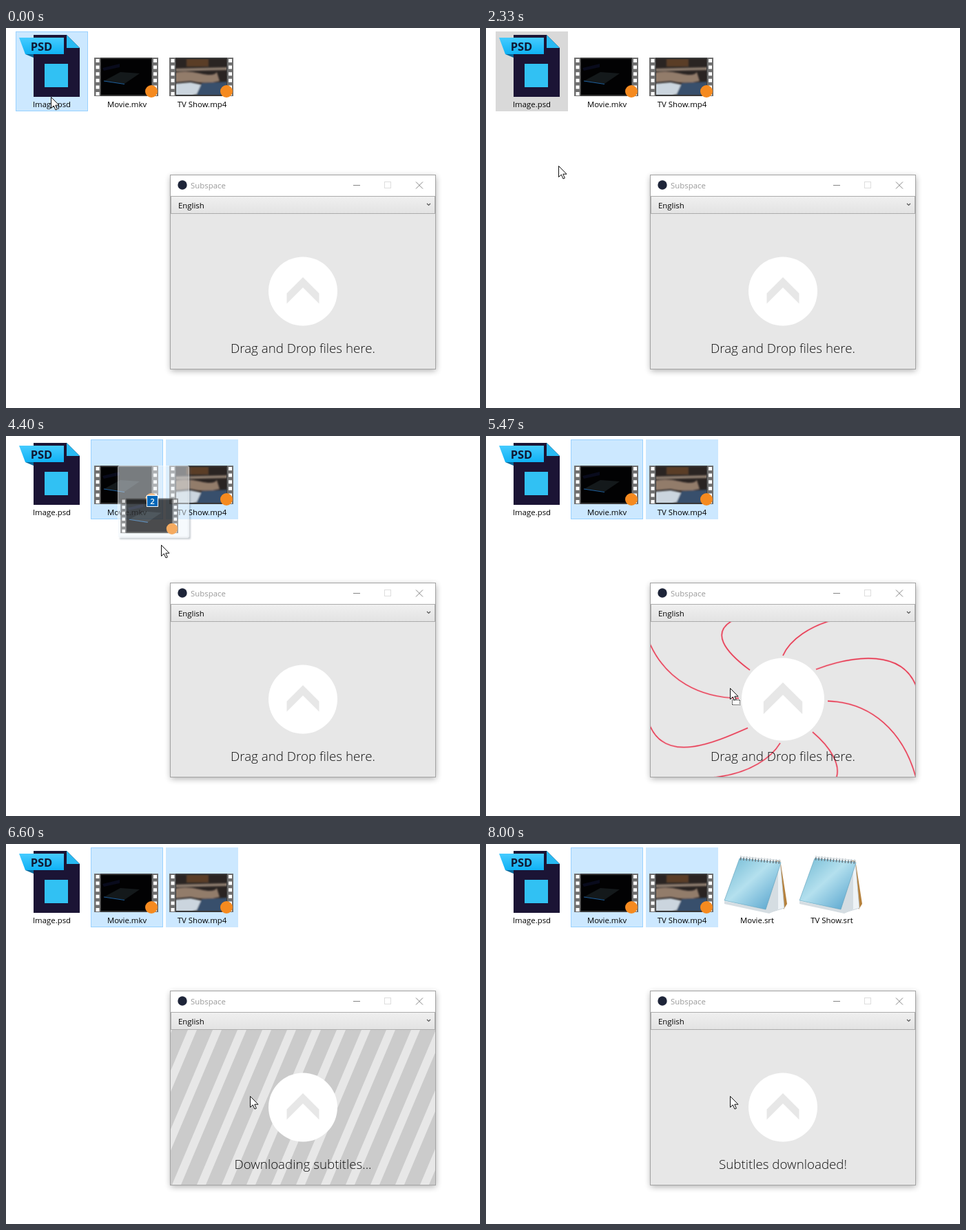
Recreate the animation shown at these times as an HTML page. Size 688 by 552 pixels, loop 8.19 s.

```html
<!DOCTYPE html>
<html lang="en">
<head>
<meta charset="utf-8">
<title>Drag and drop subtitles</title>
<style>
html, body { margin: 0; width: 100%; height: 100%; overflow: hidden; background: #fff; }
svg { display: block; width: 688px; height: 552px; }
text { font: 11.4px "Open Sans", "Noto Sans", sans-serif; fill: #000; }
.mid { text-anchor: middle; }
#status { font-size: 18.75px; font-weight: 300; fill: #111; }
</style>
</head>
<body>
<svg viewBox="0 0 688 552" xmlns="http://www.w3.org/2000/svg">
  <defs>
    <linearGradient id="combo" x2="0" y2="1"><stop stop-color="#f0f0f0"/><stop offset="1" stop-color="#e3e3e3"/></linearGradient>
    <linearGradient id="tag" x2="0" y2="1"><stop stop-color="#45cbff"/><stop offset="1" stop-color="#0fb2f5"/></linearGradient>
    <linearGradient id="paper" x2="1" y2="1"><stop stop-color="#6fb8d3"/><stop offset=".45" stop-color="#b4e0ee"/><stop offset="1" stop-color="#4c9dca"/></linearGradient>
    <filter id="shade" x="-10%" y="-10%" width="120%" height="120%"><feGaussianBlur stdDeviation="5"/></filter>
    <filter id="soft" x="-10%" y="-10%" width="120%" height="120%"><feGaussianBlur stdDeviation="1.2"/></filter>
    <clipPath id="body"><rect x="239" y="270" width="384" height="225"/></clipPath>
    <clipPath id="screen"><rect x="247" y="45" width="73" height="52"/></clipPath>

    <g id="psd">
      <path d="M40 10H88L107 29V100H40Z" fill="#1b1435"/>
      <path d="M88 10L107 29H88Z" fill="#28b9f2"/>
      <path d="M28 38H40V43Z" fill="#0b6a9c"/>
      <path d="M19 14H84V38H28Z" fill="url(#tag)"/>
      <text x="51.5" y="32.5" class="mid" style="font-size:16.5px;font-weight:700;fill:#101a35">PSD</text>
      <rect x="56" y="52" width="34" height="34" fill="#31c1f3"/>
    </g>

    <g id="strip">
      <rect x="128" y="43" width="93" height="56" fill="#6f6f6f"/>
      <path d="M133 45V99M216.5 45V99" stroke="#fff" stroke-width="5" stroke-dasharray="5 4.6"/>
      <rect x="137" y="43" width="75" height="56" fill="#3a3a3a"/>
    </g>
    <g id="movie">
      <use href="#strip"/>
      <rect x="138" y="45" width="73" height="52" fill="#020203"/>
      <path d="M140 58L165 52V57L142 62Z" fill="#090b1c"/>
      <path d="M142 77L166 64L194 66L172 81Z" fill="#14191b"/>
      <path d="M142 77L172 81.5" stroke="#1f5f9c" stroke-width="1.2"/>
      <circle cx="211" cy="92" r="9" fill="#f58a1f"/>
    </g>
    <g id="show">
      <use href="#strip" x="109"/>
      <g clip-path="url(#screen)">
        <rect x="247" y="45" width="73" height="52" fill="#2a2422"/>
        <g filter="url(#soft)">
          <path d="M262 45H294V56H262Z" fill="#5a3d28"/>
          <path d="M244 59L322 57V61L244 63Z" fill="#8c7c6e"/>
          <path d="M244 65Q262 61 282 66T306 64L310 77Q290 82 268 77L244 79Z" fill="#927b6b"/>
          <path d="M244 81L268 79L287 83L294 92L270 98H244Z" fill="#cbd5de"/>
          <path d="M284 80L322 78V98H276Z" fill="#38506c"/>
        </g>
      </g>
      <circle cx="320" cy="92" r="9" fill="#f58a1f"/>
    </g>
    <g id="pad">
      <path d="M419 25L427 23L437 87L432 95Z" fill="#b5813d"/>
      <path d="M412 26L427 25L433 93L410 100Z" fill="#eef3f6" stroke="#b9c6cf" stroke-width=".7"/>
      <path d="M346 83L406 95L424 31L424 95L411 101L346 87Z" fill="#d5dde2"/>
      <path d="M368 21L428 27L406 95L346 82Z" fill="url(#paper)" stroke="#5c9cb8" stroke-width=".6"/>
      <path d="M369 20.5L428 26" stroke="#69777e" stroke-width="6" stroke-dasharray="1.6 2.7"/>
      <path d="M369 18.5L428 24" stroke="#dfe5e8" stroke-width="1.5"/>
    </g>
    <path id="arrow" d="M.5 .5V16.5L4.3 13L7 19L9.4 18L6.8 12.2H12Z" fill="#fff" stroke="#111" stroke-width="1"/>
  </defs>

  <rect width="688" height="552" fill="#fff"/>
  <g id="cells"></g>
  <use href="#psd"/><use href="#movie"/><use href="#show"/>
  <text x="66.5" y="115" class="mid">Image.psd</text>
  <text x="175.5" y="115" class="mid">Movie.mkv</text>
  <text x="284.5" y="115" class="mid">TV Show.mp4</text>
  <g id="subs">
    <use href="#pad"/><use href="#pad" x="109"/>
    <text x="393.5" y="115" class="mid">Movie.srt</text>
    <text x="502" y="115" class="mid">TV Show.srt</text>
  </g>
  <rect id="band" fill="#0078d7" fill-opacity=".34" stroke="#0078d7"/>

  <rect x="239" y="216" width="385" height="282" fill="#000" opacity=".32" filter="url(#shade)"/>
  <rect x="238.5" y="213.5" width="385" height="282" fill="#fff" stroke="#a3a3a3"/>
  <circle cx="256" cy="228" r="6.7" fill="#1d2438"/>
  <text x="268" y="233" style="fill:#999">Subspace</text>
  <g fill="none" stroke="#858585">
    <path d="M504 228.5H514M595 223.5L605 233.5M605 223.5L595 233.5"/>
    <rect x="549.5" y="223.5" width="9" height="9" stroke="#dedede"/>
  </g>
  <rect x="239" y="270" width="384" height="225" fill="#e7e7e7"/>
  <rect x="239.5" y="244.5" width="383" height="25" fill="url(#combo)" stroke="#acacac"/>
  <text x="250" y="262">English</text>
  <path d="M611 255L613.5 257.5L616 255" fill="none" stroke="#555" stroke-width="1.2"/>
  <g clip-path="url(#body)">
    <path id="stripes" fill="#cbcbcb"/>
    <g id="rays" fill="none"></g>
  </g>
  <g id="dial">
    <circle r="50" fill="#fff"/>
    <path d="M0 -20.5L23.5 3V18L0 -5.5L-23.5 18V3Z" fill="#e7e7e7"/>
  </g>
  <text id="status" x="431" y="472" class="mid"></text>

  <g id="ghost">
    <path d="M104.5 3V105.5H3" fill="none" stroke="#567" stroke-width="2" opacity=".45" filter="url(#soft)"/>
    <rect x=".5" y=".5" width="103" height="104" rx="2" fill="#eef6fb" fill-opacity=".5" stroke="#fff" stroke-opacity=".5"/>
    <use id="ghostPsd" href="#psd" transform="translate(-5 3)scale(.9)" opacity=".65"/>
    <g id="ghostFilm">
      <use href="#movie" transform="translate(-111 9)scale(.9)" opacity=".7"/>
      <rect x="42.5" y="43.5" width="16" height="16" fill="#0067b8" stroke="#fff"/>
      <text x="50.5" y="56" class="mid" style="font-weight:600;fill:#fff">2</text>
    </g>
  </g>
  <g id="pointer">
    <use href="#arrow"/>
    <g id="dropBox" shape-rendering="crispEdges">
      <rect x="3.5" y="17.5" width="11" height="7" fill="#fff" stroke="#000" stroke-dasharray="1 1" stroke-dashoffset=".5"/>
    </g>
  </g>
  <g id="denied">
    <circle r="8" fill="#fff" stroke="#fff" stroke-width="3"/>
    <circle r="7.6" fill="#fff" stroke="#000" stroke-width="2.2"/>
    <path d="M-5.3 -5.3L5.3 5.3" stroke="#000" stroke-width="2.2"/>
  </g>
</svg>
<script>
const LOOP = 8190, TICK = 1000 / 15;
const $ = id => document.getElementById(id);
const set = (id, attrs) => { for (const k in attrs) $(id).setAttribute(k, attrs[k]); };
const show = (id, on) => set(id, { visibility: on ? 'visible' : 'hidden' });
const ramp = (k, a, b) => Math.min(1, Math.max(0, (k - a) / (b - a)));
const easeOut = p => 1 - (1 - p) ** 3;

// pointer route: tick, x, y
const route = [
  [0, 65, 100], [11, 65, 100], [19, 389, 395], [29, 389, 395],
  [34, 135, 215], [37, 72, 180], [42, 154, 150], [44, 154, 150],
  [47, 260, 92], [49, 284, 88], [54, 183, 104], [62, 183, 104],
  [66, 225, 158], [70, 290, 265], [75, 354, 366], [130, 354, 366]
];

const slope = (i, c) => (route[i + 1][c] - route[i][c]) / (route[i + 1][0] - route[i][0]);
function tangent(i, c) {
  if (i < 1 || i > route.length - 2) return 0;
  const a = slope(i - 1, c), b = slope(i, c);
  return a * b > 0 ? 2 * a * b / (a + b) : 0;
}
function pointAt(k) {
  let i = 0;
  while (i < route.length - 2 && route[i + 1][0] <= k) i++;
  const h = route[i + 1][0] - route[i][0], u = (k - route[i][0]) / h, v = 1 - u;
  return [1, 2].map(c =>
    v * v * (1 + 2 * u) * route[i][c] + u * u * (3 - 2 * u) * route[i + 1][c] +
    h * u * v * (v * tangent(i, c) - u * tangent(i + 1, c)));
}

const cells = [14, 123, 232].map(x => {
  const r = document.createElementNS('http://www.w3.org/2000/svg', 'rect');
  for (const [k, v] of Object.entries({ x: x + .5, y: 5.5, width: 104, height: 115 })) r.setAttribute(k, v);
  return $('cells').appendChild(r);
});
const looks = {
  none: ['none', 'none'], focus: ['#fff', '#99d1ff'], grey: ['#d9d9d9', '#d9d9d9'],
  picked: ['#cce8ff', '#cce8ff'], active: ['#cce8ff', '#99d1ff']
};
function paint(cell, look) {
  cell.setAttribute('fill', looks[look][0]);
  cell.setAttribute('stroke', looks[look][1]);
}

const curves = [
  'M431 319C441 296 470 275 512 265', 'M479 339C535 318 607 309 626 368',
  'M496 385C560 387 606 430 624 496', 'M474 430C500 452 516 478 508 498',
  'M427 446C415 466 385 490 331 496', 'M380 424C330 446 262 476 238 421',
  'M367 381C310 380 262 355 238 302', 'M383 340C345 312 327 285 358 268'
];
$('rays').innerHTML = curves.map(d =>
  `<path d="${d}" pathLength="1" stroke="#f5a3b0" stroke-width="3" stroke-opacity=".55"/>` +
  `<path d="${d}" pathLength="1" stroke="#e5374f" stroke-width="1.3"/>`).join('');

function stripes(k) {
  const period = 36, wide = 23, lean = 95;
  const shift = ((k - 99) * 2.4 % period + period) % period;
  let d = '';
  for (let x = 169 + shift; x < 730; x += period) d += `M${x} 270h${wide}l${-lean} 225h${-wide}Z`;
  return d;
}

function draw(ms) {
  const k = Math.floor((ms % LOOP + 4) / TICK);
  const [x, y] = pointAt(k);
  const inside = x > 238 && y > 213;
  const dragOne = k >= 12 && k < 30, dragTwo = k >= 63 && k < 90;

  paint(cells[0], k < 12 ? 'active' : k < 45 ? 'grey' : k < 63 ? 'focus' : 'none');
  paint(cells[1], k < 45 ? 'none' : k < 63 ? 'picked' : 'active');
  paint(cells[2], k < 47 ? 'none' : 'picked');

  const banding = k >= 45 && k < 50;
  show('band', banding);
  if (banding) {
    const [bx, by] = pointAt(k - .15).map(Math.round);
    set('band', { x: 154.5, y: by + .5, width: Math.max(0, bx - 154), height: Math.max(0, 150 - by) });
  }

  const ghost = !inside && (dragOne && y > 119 || dragTwo);
  show('ghost', ghost);
  show('ghostPsd', ghost && dragOne);
  show('ghostFilm', ghost && dragTwo);
  set('ghost', { transform: `translate(${Math.round(x) - 63} ${Math.round(y) - 115})` });

  const denied = dragOne && inside;
  const place = `translate(${Math.round(x)} ${Math.round(y)})`;
  show('pointer', !denied);
  show('dropBox', dragTwo && inside);
  show('denied', denied);
  set('pointer', { transform: place });
  set('denied', { transform: place });

  const open = easeOut(ramp(k, 68, 78)) * (1 - easeOut(ramp(k, 89, 95)));
  set('dial', { transform: `translate(431 382.5)scale(${1 + .2 * open})` });
  set('rays', { 'stroke-dasharray': '1 1', 'stroke-dashoffset': open - 1, opacity: Math.min(1, open * 3) });
  set('stripes', { d: stripes(k), opacity: ramp(k, 89, 95) * (1 - ramp(k, 102, 106)) });

  $('status').textContent = k < 90 ? 'Drag and Drop files here.'
    : k < 103 ? 'Downloading subtitles...' : 'Subtitles downloaded!';
  show('subs', k >= 120);
}

const start = performance.now();
function loop() {
  draw(performance.now() - start);
  requestAnimationFrame(loop);
}
loop();
</script>
</body>
</html>
```
